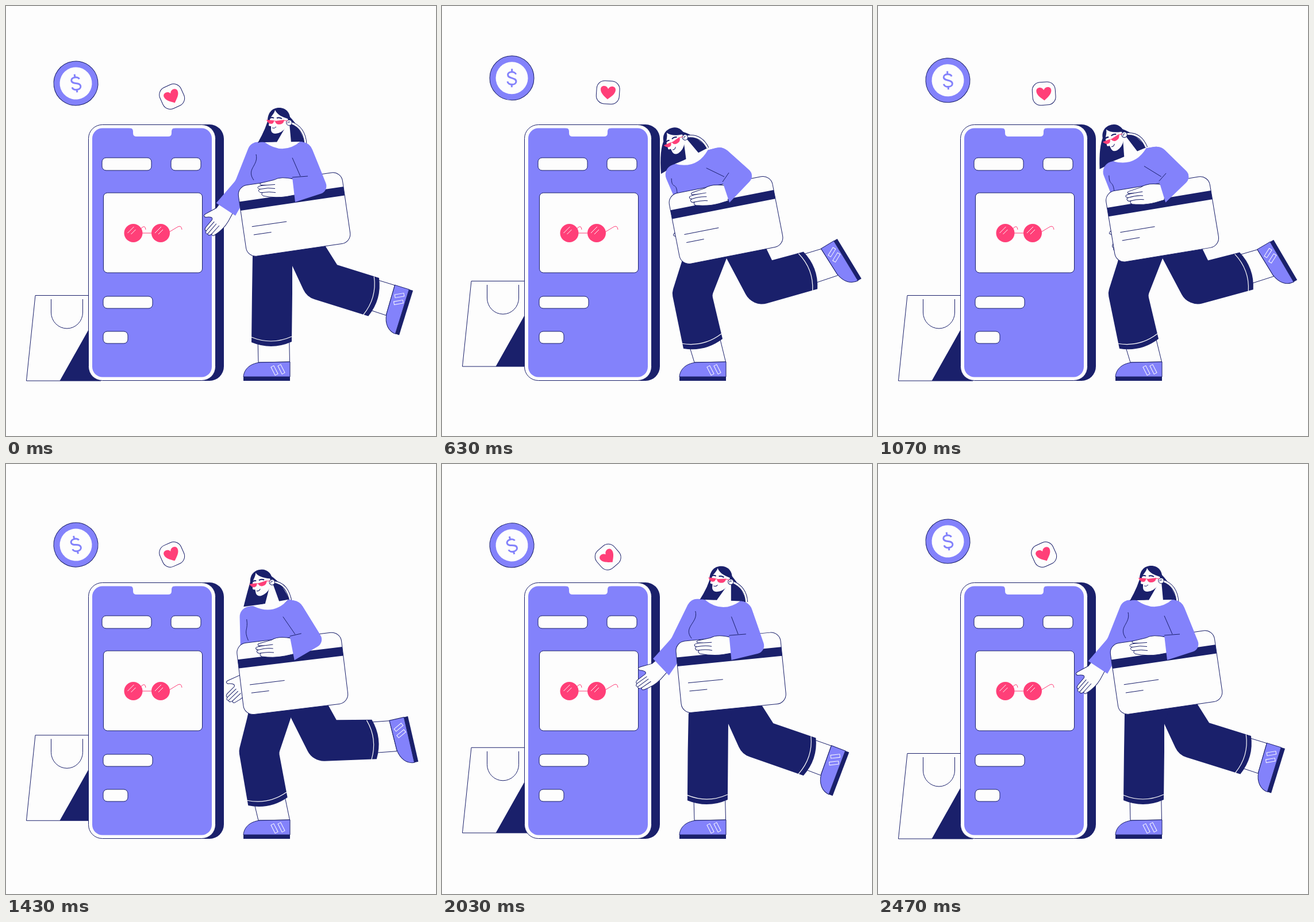
Recreate the animation shown at these times as an HTML page with a canvas. Size 748 px wide and 748 px high, loop 2510 ms.

```html
<!DOCTYPE html>
<html lang="en">
<head>
<meta charset="utf-8">
<title>Mobile shopping</title>
<style>
  html, body { margin: 0; width: 748px; height: 748px; overflow: hidden; background: #fdfdfd; }
  canvas { display: block; width: 748px; height: 748px; }
</style>
</head>
<body>
<canvas id="stage"></canvas>
<script>
const SIZE = 748, LOOP = 2510, STEP = 33.37, LAST = 74, HOP = 37;
const WHITE = '#fdfdfd', NAVY = '#1a206b', VIOLET = '#8382fb', PINK = '#ff3f78';

const canvas = document.getElementById('stage');
const ctx = canvas.getContext('2d');
const dpr = window.devicePixelRatio || 1;
canvas.width = canvas.height = SIZE * dpr;

// Cyclic monotone cubic through [time, value] pairs.
function cycle(...pairs) {
  const n = pairs.length;
  const k = [...pairs.map(p => p[0]), LAST], v = [...pairs.map(p => p[1]), pairs[0][1]];
  const d = pairs.map((_, i) => (v[i + 1] - v[i]) / (k[i + 1] - k[i]));
  const m = k.map((_, i) => {
    const a = d[(i + n - 1) % n], b = d[i % n];
    return a * b > 0 ? 2 * a * b / (a + b) : 0;
  });
  return t => {
    t = (t + LAST) % LAST;
    let i = 0;
    while (i < n - 1 && t >= k[i + 1]) i++;
    const h = k[i + 1] - k[i], u = (t - k[i]) / h, w = 1 - u;
    return w * w * (1 + 2 * u) * v[i] + u * u * (3 - 2 * u) * v[i + 1]
      + h * u * w * (w * m[i] - u * m[i + 1]);
  };
}
const lean = cycle([0, 0], [10, .69], [19, 1], [32, .92], [52, 0], [61, -.15]);
const bend = cycle([0, 0], [10, .95], [19, 1], [32, 1], [52, .53], [61, 0]);

const rad = a => a * Math.PI / 180;
const mix = (a, b, u) => [a[0] + (b[0] - a[0]) * u, a[1] + (b[1] - a[1]) * u];
const place = (o, a, x, y) => {
  const c = Math.cos(rad(a)), s = Math.sin(rad(a));
  return [o[0] + x * c - y * s, o[1] + x * s + y * c];
};

// The legs lead and the loose limbs trail the lean of the body.
function poseAt(t) {
  const L = lean(t), phase = 360 * t / LAST;
  const sway = lag => Math.cos(rad(phase - lag));
  const shift = (x, y, dx, dy) => [x + dx * L, y + dy * L * L];
  const chest = (x, y) => place(shift(480, 245, -44, 26), -22 * L, x, y);
  return {
    t, L, sway, shift, chest, bend: bend(t), kick: lean(t - 2.5), reach: lean(t - 4),
    head: shift(475, 200, -69, 34), headTilt: -28 * L,
    neckL: chest(-30, -8), neckR: chest(32, -9), dip: chest(2, 15),
    shoulderL: chest(-54, -9), shoulderR: shift(528, 238, -40, 6),
    waist: shift(430, 310, -25, 25), elbow: [562 - 17 * L, 322 - 27 * L],
    cuffTop: shift(498, 298, -10, 8), cuffLow: shift(503, 341, -3, 1)
  };
}

function paint(path, fill, line, width = 1) {
  if (fill) { ctx.fillStyle = fill; ctx.fill(path); }
  if (line) { ctx.strokeStyle = line; ctx.lineWidth = width; ctx.stroke(path); }
}
const draw = (d, fill, line, width) => paint(new Path2D(d), fill, line, width);
const at = ([x, y]) => `${x},${y} `;

function box(x, y, w, h, r, fill, line) {
  const p = new Path2D();
  p.roundRect(x, y, w, h, r);
  paint(p, fill, line);
}
function disc(x, y, r, fill, line) {
  const p = new Path2D();
  p.arc(x, y, r, 0, 7);
  paint(p, fill, line);
}
function group([x, y], angle, fn) {
  ctx.save();
  ctx.translate(x, y);
  ctx.rotate(rad(angle));
  fn();
  ctx.restore();
}
// Polygon of [point, corner radius] pairs.
function rounded(corners, fill) {
  const p = new Path2D(), n = corners.length;
  p.moveTo(...mix(corners[n - 1][0], corners[0][0], .5));
  corners.forEach(([c, r = 0], i) => p.arcTo(...c, ...corners[(i + 1) % n][0], r));
  p.closePath();
  paint(p, fill);
}

function bagLift(t) {
  const p = t % HOP, rest = u => Math.max(0, 1 - u) ** 2.2;
  return 47 * (p < 15 ? 1 - rest(p / 15) : rest((p - 15) / 16));
}
function drawBag({ t }) {
  group([0, -bagLift(t)], 0, () => {
    draw('M51,503.5H165V652H35.5Z', WHITE, NAVY);
    draw('M93.5,652L147,557H165V652Z', NAVY);
    draw('M78.5,510V533A27.5,28 0 0 0 133.5,533V510', null, NAVY);
  });
}

function drawLens(x) {
  disc(x, 395, 16, PINK);
  draw(`M${x - 10},395l11,-11M${x - 4},397l8,-8`, null, WHITE);
}

function drawPhone() {
  box(157, 206, 222, 446, 25, NAVY);
  box(143.5, 206.5, 221, 445, 24, WHITE, NAVY);
  box(150, 212.5, 208, 433, 18, VIOLET);
  draw('M214,212Q221,212 221,218V221Q221,227 227,227H282Q288,227 288,221V218Q288,212 295,212Z', WHITE);
  const field = (x, y, w, h) => box(x, y, w, h, 7, WHITE, NAVY);
  field(167, 264, 86, 22);
  field(287, 264, 52, 22);
  field(169.5, 325, 172, 139);
  field(169, 505, 86, 21);
  field(169, 566, 43, 21);
  draw('M237,395H254M232,390L237,385Q242,381 243,389M284,393L299,384Q305,381 306,389', null, PINK);
  drawLens(221.5);
  drawLens(269);
}

function drawBadges({ t, sway }) {
  const a = rad(360 * t / LAST), y = 134.5 - 9 * Math.sin(a) + 2 * Math.sin(2 * a);
  group([121.5, y], 126 - y, () => {
    disc(0, 0, 38.5, VIOLET, NAVY);
    disc(0, 0, 28, WHITE);
    draw('M7,-6.5C5.5,-12 -7,-12 -7,-5.5C-7,1.5 7.5,-1.5 7.5,6C7.5,13 -6.5,13 -7.5,6M0,-16V-10M0,10V16',
      null, VIOLET, 3);
  });
  const w = sway(285);
  group([288.7, 156 + 5.8 * w], -18.5 - 23 * w, () => {
    box(-20, -20, 40, 40, 14, WHITE, NAVY);
    draw('M0,12C-6,7 -13,2 -13,-5C-13,-12 -3,-13 0,-6C3,-13 13,-12 13,-5C13,2 6,7 0,12Z', PINK);
  });
}

function drawShoe(pos, angle) {
  group(pos, angle, () => {
    draw('M-81,-7C-80,-20 -70,-30 -52,-32L0,-33V-7Z', VIOLET, NAVY);
    ctx.fillStyle = NAVY;
    ctx.fillRect(-81, -7, 81, 7);
    for (const p of [[-27, -18], [-15, -20]])
      group(p, -27, () => box(-2.7, -8, 5.4, 16, 0, null, WHITE));
  });
}

// Ankle and shoe below a trouser hem that runs from a to b.
function drawFoot(a, b, shoe, angle) {
  draw('M' + at(mix(a, b, .06)) + 'L' + at(place(shoe, angle, -.5, -33))
    + 'L' + at(place(shoe, angle, -55, -32)) + 'L' + at(mix(a, b, .84)), WHITE, NAVY);
  drawShoe(shoe, angle);
}

// Quadratic edge from a to b bowed outward, shifted by off along its normal.
function hem(a, b, off) {
  const len = Math.hypot(b[0] - a[0], b[1] - a[1]);
  const n = [(b[1] - a[1]) / len, (a[0] - b[0]) / len];
  const move = (p, k) => [p[0] + n[0] * k, p[1] + n[1] * k];
  return [move(a, off), move(mix(a, b, .5), off + 15), move(b, off)];
}
function stitch(a, b) {
  const [p, c, q] = hem(a, b, -9);
  draw('M' + at(p) + 'Q' + at(c) + at(q), null, WHITE, 1.2);
}

const crotchOf = s => mix([498, 452], [495, 439], s.bend);

function drawKick(s) {
  const k = s.kick, crotch = crotchOf(s);
  const a = mix([648, 471], [628, 426], k), b = place(a, 14 - 36 * k, 0, 69);
  drawFoot(a, b, place(a, 18.5 - 41 * k, 63, 0), -75 - 48 * k);
  const p = new Path2D();
  p.moveTo(500, 390);
  p.lineTo(540, 390);
  p.lineTo(...mix([556, 418], [564, 421], k));
  p.lineTo(...mix([576, 450], [574, 442], k));
  p.lineTo(...a);
  p.quadraticCurveTo(...hem(a, b, 0)[1], ...b);
  p.arcTo(...mix([524, 507], [541, 525], k), ...crotch, 32);
  p.lineTo(...crotch);
  paint(p, NAVY);
  stitch(a, b);
}

function drawLeg(s) {
  const u = s.bend, crotch = crotchOf(s), hip = mix([429, 435], [417, 445], u);
  const a = mix([497, 584], [488, 579], u), b = mix([427, 585], [420, 596], u);
  drawFoot(a, b, [494, 652], 0);
  const p = new Path2D();
  p.moveTo(hip[0] + 12, 390);
  p.lineTo(...hip);
  p.arcTo(...mix([428, 500], [400, 499], u), ...b, 25);
  p.lineTo(...b);
  p.quadraticCurveTo(...hem(a, b, 0)[1], ...a);
  p.arcTo(...mix([498, 500], [470, 503], u), ...crotch, 12);
  p.lineTo(...crotch);
  p.lineTo(crotch[0] + 20, 390);
  paint(p, NAVY);
  stitch(a, b);
}

function drawFarArm(s) {
  const hand = mix([386, 354], [440, 378], s.reach), aim = 122 + 15 * s.sway(275);
  group(hand, aim, () => {
    draw('M-8,-14L16,-16Q32,-17 50,-9Q54,-6 50,-4Q57,-2 54,2Q57,6 51,7Q52,11 46,11L29,9'
      + 'Q23,11 32,21Q33,27 27,24L8,14L-8,13', WHITE, NAVY);
    draw('M50,-4L31,-7M54,2L31,-1M51,7L30,4', null, NAVY);
  });
  rounded([[s.neckL], [s.shoulderL, 18], [mix([400, 306], [412, 334], s.reach), 22],
    [place(hand, aim, 1, 19)], [place(hand, aim, 1, -21)], [s.waist]], VIOLET);
}

function drawBackHair(s) {
  const { neckL, neckR } = s, h = (x, y) => at(place(s.head, s.headTilt, x, y));
  const end = at(s.shift(521, 240, -59, 7));
  const strand = 'M' + h(20, 3) + 'Q' + h(44, 11) + end;
  draw('M' + h(-17, -10) + 'Q' + at(s.shift(453, 212, -75, 38)) + at(s.shift(438, 238, -57, 54))
    + 'L' + at(mix(neckL, neckR, .3)) + 'L' + end + 'Q' + h(36, 10) + h(18, -8) + 'Z', NAVY);
  draw(strand, null, NAVY, 5);
  draw(strand, null, WHITE, 3);
  draw('M' + at(neckL) + 'Q' + at(s.dip) + at(neckR) + 'Z', WHITE);
  draw('M' + h(11, 11) + 'L' + h(18, 4) + 'L' + at(mix(neckL, neckR, .74)) + 'L' + at(s.dip)
    + 'L' + at(mix(neckL, neckR, .34)) + 'Z', WHITE);
}

function drawTorso(s) {
  const p = new Path2D();
  p.moveTo(...s.waist);
  p.arcTo(...s.shoulderL, ...s.neckL, 18);
  p.lineTo(...s.neckL);
  p.quadraticCurveTo(...s.dip, ...s.neckR);
  p.arcTo(...s.shoulderR, ...s.elbow, 22);
  p.arcTo(...s.elbow, ...s.cuffLow, 14);
  p.lineTo(...s.cuffLow);
  paint(p, VIOLET);
  const a = s.chest(-45, 13), b = s.shift(431, 303, -22, 22), k = 1 - .9 * s.L;
  draw('M' + at(a) + 'C' + at([a[0] + 5 * k, a[1] + 20]) + at([b[0] - 14 * k, b[1] - 20]) + at(b), null, NAVY);
}

function drawCard(s) {
  group(s.shift(501.5, 362.5, -7.5, 10), -8.3 - 2.8 * s.sway(90), () => {
    box(-91.5, -62.5, 183, 125, 17, WHITE);
    ctx.fillStyle = NAVY;
    ctx.fillRect(-91.5, -35.5, 183, 15.5);
    box(-91.5, -62.5, 183, 125, 17, null, NAVY);
    draw('M-76,10.5H-15M-75,25H-44', null, NAVY);
  });
}

function drawNearArm(s) {
  const a = s.chest(18, 19), b = s.shift(512, 296, -21, 1);
  group(s.shift(500, 315.5, -8, 11), -6 * s.L, () => {
    draw('M2,-14Q-22,-20 -34,-13L-55,-8Q-60,-7 -57,-4L-46,-4Q-62,-3 -62,0Q-62,3 -57,3'
      + 'Q-62,4 -60,7Q-59,10 -54,9Q-57,13 -52,15Q-30,19 -12,16L4,13', WHITE, NAVY);
    draw('M-57,3Q-44,0 -32,2M-54,9Q-42,7 -31,9M-46,-4L-32,-5', null, NAVY);
  });
  rounded([[a], [s.neckR], [s.shoulderR, 22], [s.elbow, 14], [s.cuffLow], [s.cuffTop], [b]], VIOLET);
  draw('M' + at(a) + 'L' + at(b) + 'M' + at(s.cuffTop) + 'L' + at(s.shift(525, 296, -26, -6)), null, NAVY);
}

function drawHead(s) {
  group(s.head, s.headTilt, () => {
    draw('M-20,3C-21,-14 -12,-23 0,-23C13,-23 21,-13 19,2L10,8L-14,6Z', NAVY);
    draw('M-7,-19C-9,-11 -15,-8 -16,-2L-18,7Q-18,9 -14,9L-14,16Q-13,22 -6,22Q5,21 12,11L18,4'
      + 'L15,-4C5,-7 -3,-11 -7,-19Z', WHITE);
    disc(17.5, 3, 4.8, WHITE, NAVY);
    draw('M15,4Q16,0 19,2', null, NAVY);
    draw('M-16,-5Q-12,-7 -9,-5M-4,-5Q0,-7 5,-4', null, NAVY, 2);
    draw('M-22,-2L-9,-1Q-9,5 -14,5Q-19,5 -22,-2ZM-7,0L9,-2Q8,6 0,6Q-6,6 -7,0Z', PINK);
    draw('M-10,0H-6M8,-1L15,0', null, PINK);
    draw('M-12,12Q-8,14 -5,10', null, NAVY);
  });
}

const layers = [drawBag, drawPhone, drawBadges, drawKick, drawLeg, drawFarArm,
  drawBackHair, drawTorso, drawCard, drawNearArm, drawHead];

function render(t) {
  ctx.setTransform(dpr, 0, 0, dpr, 0, 0);
  ctx.fillStyle = WHITE;
  ctx.fillRect(0, 0, SIZE, SIZE);
  const pose = poseAt(t);
  layers.forEach(layer => layer(pose));
}

const start = performance.now();
function tick() {
  const ms = (performance.now() - start) % LOOP;
  render(Math.min(LAST, Math.floor((ms + 4) / STEP)));
  requestAnimationFrame(tick);
}
tick();
</script>
</body>
</html>
```
